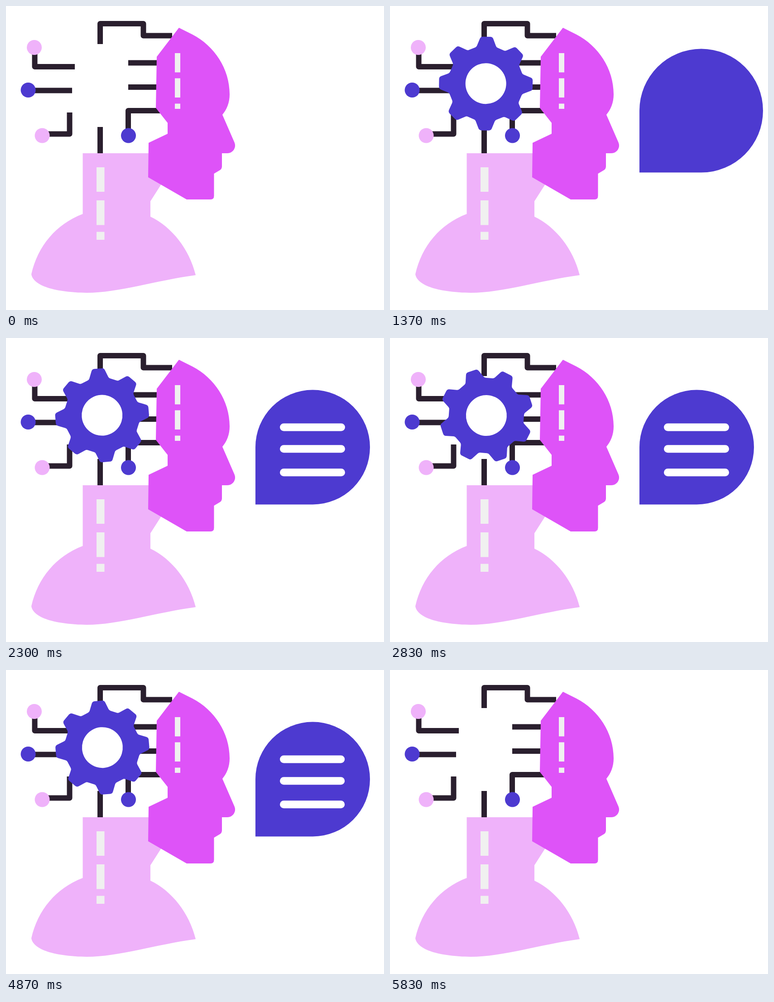
These frames come from a looping animation (835x671 px, 6.01 s). An HTML page with a canvas:

```html
<!DOCTYPE html>
<html lang="en">
<head>
<meta charset="utf-8">
<title>Thinking machine</title>
<style>
html, body { margin: 0; width: 100%; height: 100%; overflow: hidden; background: #fff; }
canvas { display: block; }
</style>
</head>
<body>
<canvas id="stage" width="835" height="671"></canvas>
<script>
const ctx = document.getElementById('stage').getContext('2d');
const LOOP = 6010, STEP = 100 / 3;
const BLUE = '#4d3ad0', PINK = '#efb2fa', MAGENTA = '#de53f8', DARK = '#2a1f2e', PALE = '#f0f0f0';

const body = new Path2D(`M169.5 325 H350 V383 L342 395 L319 431 V465
  C367 488 405 537 419 594 C330 606 250 633 178 633
  C110 632 60 618 56 592 C70 530 110 482 169.5 459 Z`);
const face = new Path2D(`M382 48 L333 112 L331 225 L357 258 V282 L315 302 L314 378 L399 427
  H452 Q459.5 427 459.5 419 V370 L473 362 Q477 359 477 354 V325 H489
  A17 17 0 0 0 504.6 301 L478 240 C488 228 494 213 494 195
  C494 138 460 88 412 63 Z`);
const wires = new Path2D(`M208 84 V39 H303.5 V65.5 H367 M270 125.5 H336 M270 179 H336
  M270 275 V231 H345 M63.5 95 V134 H152 M50 186.5 H146 M85 282.5 H140.5 V235 M208 267 V326`);
const balls = [[62.5, 91.5, PINK], [49, 185.5, BLUE], [80, 286, PINK], [270.5, 286, BLUE]];
const dashes = [
  [200, 356, 17.5, 54], [200, 429, 17.5, 54.5], [200, 498.5, 17.5, 17.5],
  [373, 104, 12, 42.5], [373, 159.5, 12, 42.5], [373, 215.5, 12, 11.5]
];

const span = (t, from, to) => Math.min(1, Math.max(0, (t - from) / (to - from)));
const sine = p => (1 - Math.cos(Math.PI * p)) / 2;
const quart = p => p < 0.5 ? 8 * p ** 4 : 1 - 8 * (1 - p) ** 4;
const leave = t => 1 - span(t, 5141, 5816) ** 2.5;

// Eight teeth with rounded tips and valleys, around the origin
function makeGear() {
  const path = new Path2D(), pts = [];
  const polar = (r, deg) => [r * Math.sin(deg * Math.PI / 180), -r * Math.cos(deg * Math.PI / 180)];
  for (let a = 0; a < 360; a += 45) {
    pts.push(polar(104.2, a - 7.2), polar(104.2, a + 7.2), polar(83.5, a + 15.3), polar(83.5, a + 29.7));
  }
  const last = pts[pts.length - 1];
  path.moveTo((last[0] + pts[0][0]) / 2, (last[1] + pts[0][1]) / 2);
  pts.forEach((p, i) => path.arcTo(...p, ...pts[(i + 1) % pts.length], 7));
  path.closePath();
  path.moveTo(45, 0);
  path.arc(0, 0, 45, 0, Math.PI * 2);
  return path;
}
const gear = makeGear();

function drawGear(t) {
  const scale = (1 - (1 - span(t, 0, 915)) ** 3) * leave(t);
  if (scale <= 0) return;
  ctx.save();
  ctx.translate(212.3, 171.2);
  ctx.scale(scale, scale);
  ctx.rotate(175 * Math.PI / 180 * quart(span(t, 920, 3700)));
  ctx.translate(-0.6, 0);
  ctx.fillStyle = BLUE;
  ctx.fill(gear, 'evenodd');
  ctx.restore();
}

// Grows past full size, dips below it, then settles
function bubbleScale(t) {
  if (t < 1340) return 1.08 * sine(span(t, 970, 1340));
  if (t < 1810) return 1.08 - 0.122 * sine(span(t, 1340, 1810));
  return 0.958 + 0.042 * sine(span(t, 1810, 2200));
}

function drawBubble(t) {
  const size = 253 * bubbleScale(t) * leave(t);
  if (size <= 0) return;
  const x = 551, y = 367.5, r = size / 2;
  ctx.fillStyle = BLUE;
  ctx.beginPath();
  ctx.moveTo(x, y);
  ctx.arc(x + r, y - r, r, Math.PI, Math.PI * 2.5);
  ctx.closePath();
  ctx.fill();

  const width = 127 * sine(span(t, 1460, 2170)) * (1 - sine(span(t, 4850, 5190)));
  if (width <= 0) return;
  ctx.strokeStyle = '#fff';
  ctx.lineWidth = 17;
  ctx.lineCap = 'round';
  ctx.beginPath();
  for (const row of [197, 244.8, 296.8]) {
    ctx.moveTo(613.5, row);
    ctx.lineTo(613.5 + width, row);
  }
  ctx.stroke();
}

function drawFigure() {
  ctx.strokeStyle = DARK;
  ctx.lineWidth = 12;
  ctx.lineCap = 'butt';
  ctx.lineJoin = 'round';
  ctx.stroke(wires);
  for (const [x, y, color] of balls) {
    ctx.fillStyle = color;
    ctx.beginPath();
    ctx.arc(x, y, 16.5, 0, Math.PI * 2);
    ctx.fill();
  }
  ctx.fillStyle = PINK;
  ctx.fill(body);
  ctx.fillStyle = MAGENTA;
  ctx.fill(face);
  ctx.fillStyle = PALE;
  for (const d of dashes) ctx.fillRect(...d);
}

function draw(now) {
  const t = Math.floor((now % LOOP + 4) / STEP) * STEP;
  ctx.fillStyle = '#fff';
  ctx.fillRect(0, 0, 835, 671);
  drawFigure();
  drawGear(t);
  drawBubble(t);
}

let start;
function tick(now) {
  start ??= now;
  draw(now - start);
  requestAnimationFrame(tick);
}
draw(0);
requestAnimationFrame(tick);
</script>
</body>
</html>
```
